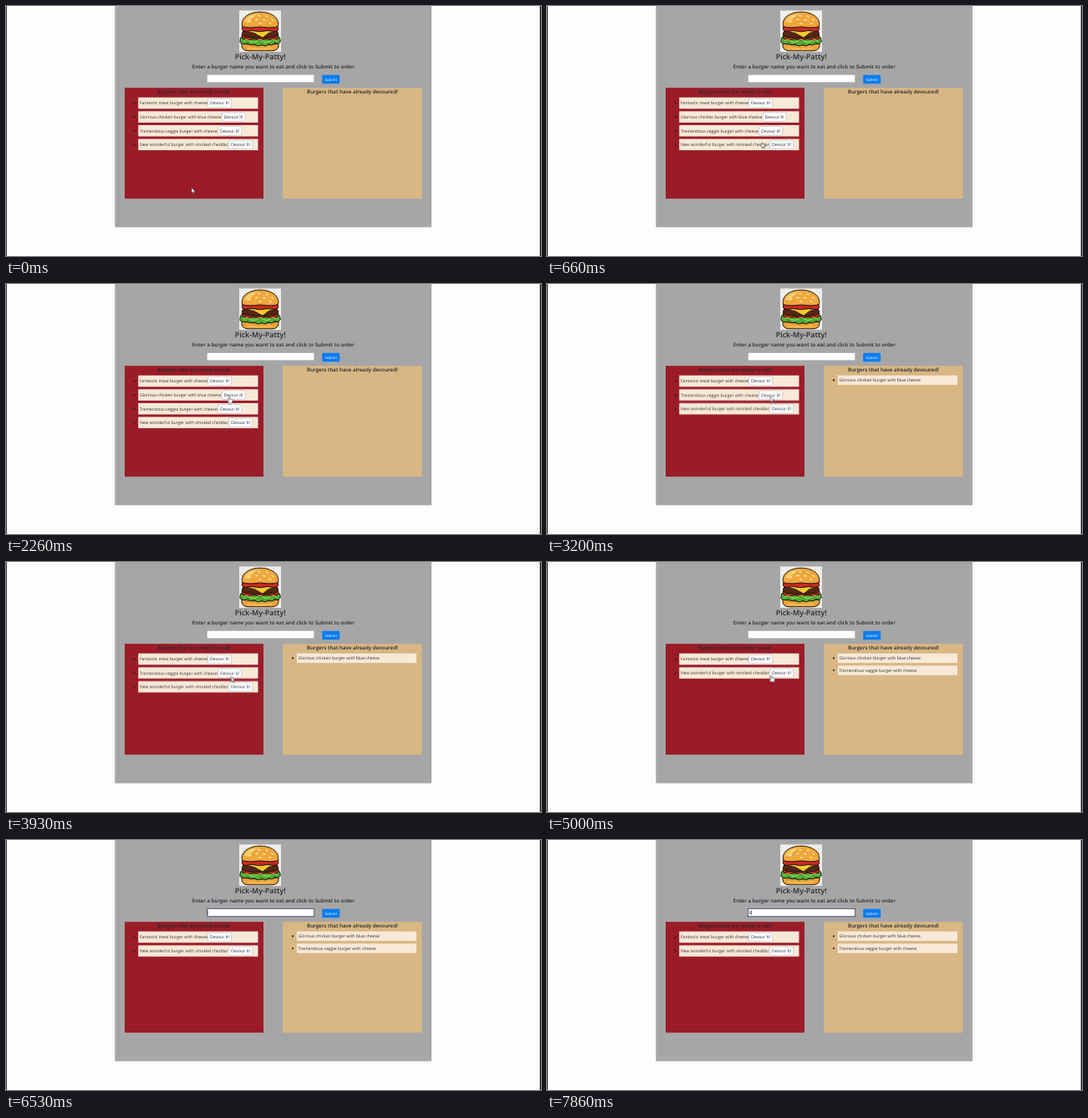
These frames come from a looping animation (640 by 300 pixels, 8000 ms). An HTML page:

```html
<!DOCTYPE html>
<html lang="en">
<head>
<meta charset="utf-8">
<title>Burger order page</title>
<style>
html, body { margin: 0; width: 100%; height: 100%; overflow: hidden; background: #fdfdfd; }
svg { display: block; width: 100vw; height: 100vh; }
text { font: 5.08px "Open Sans", "Noto Sans", sans-serif; fill: #30302f; text-rendering: geometricPrecision; }
.head { font-weight: 600; fill: #26292c; text-anchor: middle; }
.title { font-size: 8.9px; }
.sub { font-size: 6.2px; }
.bar { fill: #f8e9d7; }
.btn rect { fill: #fbfbfb; stroke: #b3b8c2; stroke-width: .6; }
.btn text { fill: #2b3138; }

.row, .done, .focus, .caret, .typed, .arrow, .hand, .pointer { animation: 8s infinite step-end; }
.r2 { animation-name: row2; }
.r3 { animation-name: row3; }
.r4 { animation-name: row4; }
.d1 { animation-name: done1; }
.d2 { animation-name: done2; }
.focus { animation-name: focus; }
.caret { animation-name: caret; }
.typed { animation-name: typed; }
.arrow { animation-name: arrow; }
.hand { animation-name: hand; }
.pointer { animation-name: move; animation-timing-function: ease-in-out; }

@keyframes row2 { 0% { opacity: 1 } 31.625%, 100% { opacity: 0 } }
@keyframes row3 {
  0% { transform: translateY(33.2px); opacity: 1 }
  31.625% { transform: translateY(16.6px); opacity: 1 }
  62.5%, 100% { transform: translateY(16.6px); opacity: 0 }
}
@keyframes row4 {
  0% { transform: translateY(49.8px) }
  31.625% { transform: translateY(33.2px) }
  62.5%, 100% { transform: translateY(16.6px) }
}
@keyframes done1 { 0% { opacity: 0 } 31.625%, 100% { opacity: 1 } }
@keyframes done2 { 0% { opacity: 0 } 62.5%, 100% { opacity: 1 } }
@keyframes focus { 0% { opacity: 0 } 78.25%, 100% { opacity: 1 } }
@keyframes caret {
  0% { opacity: 0 } 78.25% { opacity: 1 } 85% { opacity: 0 } 91.625% { opacity: 1 }
  98.25%, 100% { opacity: 1; transform: translateX(3.2px) }
}
@keyframes typed { 0% { opacity: 0 } 98.25%, 100% { opacity: 1 } }
@keyframes arrow {
  0% { opacity: 1 } 12.5% { opacity: 0 } 39.125% { opacity: 1 } 50% { opacity: 0 }
  65.75% { opacity: 1 } 71%, 100% { opacity: 0 }
}
@keyframes hand {
  0% { opacity: 0 } 12.5% { opacity: 1 } 39.125% { opacity: 0 } 50% { opacity: 1 }
  65.75%, 100% { opacity: 0 }
}
@keyframes move {
  0%, .75% { transform: translate(222px, 218px) }
  10.75% { transform: translate(262px, 156px) }
  16.6% { transform: translate(265.5px, 135.5px) }
  20%, 39.125% { transform: translate(267px, 135px) }
  49.1% { transform: translate(269.5px, 137.5px) }
  52.5%, 65.75% { transform: translate(268.3px, 136px); animation-timing-function: ease-in }
  68% { transform: translate(215px, 205px); animation-timing-function: linear }
  69% { transform: translate(180px, 222px); animation-timing-function: linear }
  70% { transform: translate(150px, 190px); animation-timing-function: linear }
  71%, 100% { transform: translate(147px, 150px) }
}
</style>
</head>
<body>
<svg viewBox="0 0 640 300" preserveAspectRatio="none">
  <defs>
    <g id="devour" class="btn">
      <rect x=".3" y="111.2" width="28.2" height="10.7" rx="1"/>
      <text x="2.8" y="118.4">Devour It!</text>
    </g>
    <g id="slot">
      <circle cx="153.6" cy="116.6" r="1.1" fill="#3a1a1c"/>
      <rect class="bar" x="158.2" y="109.7" width="143.3" height="13.6"/>
    </g>
    <g id="eaten">
      <circle cx="343" cy="115.4" r="1.1" fill="#2b2620"/>
      <rect class="bar" x="347.8" y="109.7" width="143.2" height="11.4"/>
    </g>
  </defs>

  <!-- page -->
  <path d="M0 0H.8V300H0ZM638.7 0H640V300H638.7Z" fill="#111"/>
  <rect x="130.3" width="378.7" height="265.5" fill="#a6a6a6"/>
  <rect x="142" y="98.2" width="166" height="133" fill="#9a1c28"/>
  <rect x="331.2" y="98.2" width="166.3" height="133" fill="#d8b784"/>

  <!-- burger picture -->
  <rect x="279" y="5.4" width="50" height="49.6" fill="#eeeeec"/>
  <g stroke="#20160c" stroke-width="1" stroke-linejoin="round">
    <path d="M282 45Q304 49 326 45Q327 53.8 318 53.8H290Q281 53.8 282 45Z" fill="#eda33a"/>
    <path d="M280.5 38Q304 33 327.5 38L328.3 43Q325 47 321.5 44Q318 49 314 45.5Q310 50 306 46Q301 50 297 45.5Q293 48.5 289.5 44.5Q285 47.5 279.8 43.5Z" fill="#4fae35"/>
    <path d="M282 35.5Q304 33 326 35.5L325 39.5Q318 42 312 39.5Q303 42.5 296 39.5Q288 42 283 39Z" fill="#cf2c20"/>
    <path d="M284 30Q304 28 324 30Q328 34.5 322 37.5Q304 39.5 286 37.5Q280 34.5 284 30Z" fill="#552614"/>
    <path d="M283 29.5L325 29.5L314 32.5L307 38L297 32.5Z" fill="#f8ca2c" stroke-width=".7"/>
    <path d="M283.5 24Q304 21 324.5 24Q328 29.5 322 30.5Q312 28.5 304 30.8Q294 28.5 286 30.5Q280 29 283.5 24Z" fill="#c92a22"/>
    <path d="M282.5 24.5C280.5 13 292 7.2 304 7.2S327.5 13 325.5 24.5Q319 27 304 25Q289 27 282.5 24.5Z" fill="#f0a63a"/>
  </g>
  <path d="M285 19Q288 10 303 9.2Q294 12 290.5 20Z" fill="#fbcd70"/>
  <path d="M294 13l2-1M302 11.5l2 .4M311 12l2 .8M318 16l1.4 1.2M299 16.5l2-.4M308 16.5l2 .4M291 19l1.6-1M315 20.5l1.8.6M303 21l2 .1" stroke="#fff2c8" stroke-width="1.3" stroke-linecap="round"/>
  <path d="M284 42q4-3 8 0t8 0t8 0t8 0t8 0" fill="none" stroke="#99d653" stroke-width="1.1"/>
  <path d="M288 50.5Q304 52.8 319 50.5" fill="none" stroke="#fbcd70" stroke-width="1"/>

  <!-- headings and form -->
  <text class="head title" x="304.2" y="64.3">Pick-My-Patty!</text>
  <text class="head sub" x="319.8" y="75.2">Enter a burger name you want to eat and click to Submit to order</text>
  <text class="head sub" x="225" y="104.9">Burgers that are ready to eat!</text>
  <text class="head sub" x="414.4" y="104.9">Burgers that have already devoured!</text>
  <rect x="240.4" y="82.4" width="128.3" height="9.4" fill="#fff" stroke="#8f8f8f" stroke-width=".4"/>
  <rect class="focus" x="240.4" y="82.4" width="128.3" height="9.4" fill="none" stroke="#3f4c68" stroke-width=".8"/>
  <text class="typed" x="241.4" y="88.9">B</text>
  <rect class="caret" x="241.5" y="84.3" width=".5" height="5.6" fill="#111"/>
  <rect x="378.2" y="82.8" width="20.9" height="10.4" rx="1" fill="#0a7cf4"/>
  <text x="388.7" y="89.7" text-anchor="middle" style="font-size:4.4px;fill:#fff">Submit</text>

  <!-- ready list -->
  <g>
    <use href="#slot"/><text x="160" y="118.4">Fantastic meat burger with cheese</text>
    <use href="#devour" x="241.2"/>
  </g>
  <g class="row r2">
    <g transform="translate(0 16.6)">
      <use href="#slot"/><text x="160" y="118.4">Glorious chicken burger with blue cheese</text>
      <use href="#devour" x="257.8"/>
    </g>
  </g>
  <g class="row r3">
    <use href="#slot"/><text x="160" y="118.4">Tremendous veggie burger with cheese</text>
    <use href="#devour" x="253.3"/>
  </g>
  <g class="row r4">
    <use href="#slot"/><text x="160" y="118.4">New wonderful burger with smoked cheddar</text>
    <use href="#devour" x="266.3"/>
  </g>

  <!-- devoured list -->
  <g class="done d1">
    <use href="#eaten"/><text x="349.5" y="117.2">Glorious chicken burger with blue cheese</text>
  </g>
  <g class="done d2">
    <g transform="translate(0 14.6)">
      <use href="#eaten"/><text x="349.5" y="117.2">Tremendous veggie burger with cheese</text>
    </g>
  </g>

  <g class="pointer" fill="#fff" stroke="#222" stroke-width=".5" stroke-linejoin="round">
    <path class="arrow" d="M0 0V6.4L1.5 5.1L2.5 7.4L3.5 7L2.5 4.8H4.5Z"/>
    <path class="hand" d="M-.8 .6Q0-.5.7.6V3L3.6 3.6Q4.4 3.9 4.2 5L3.6 8H-.3L-2.4 5.2Q-2.3 4.3-.8 5Z"/>
  </g>
</svg>
</body>
</html>
```
